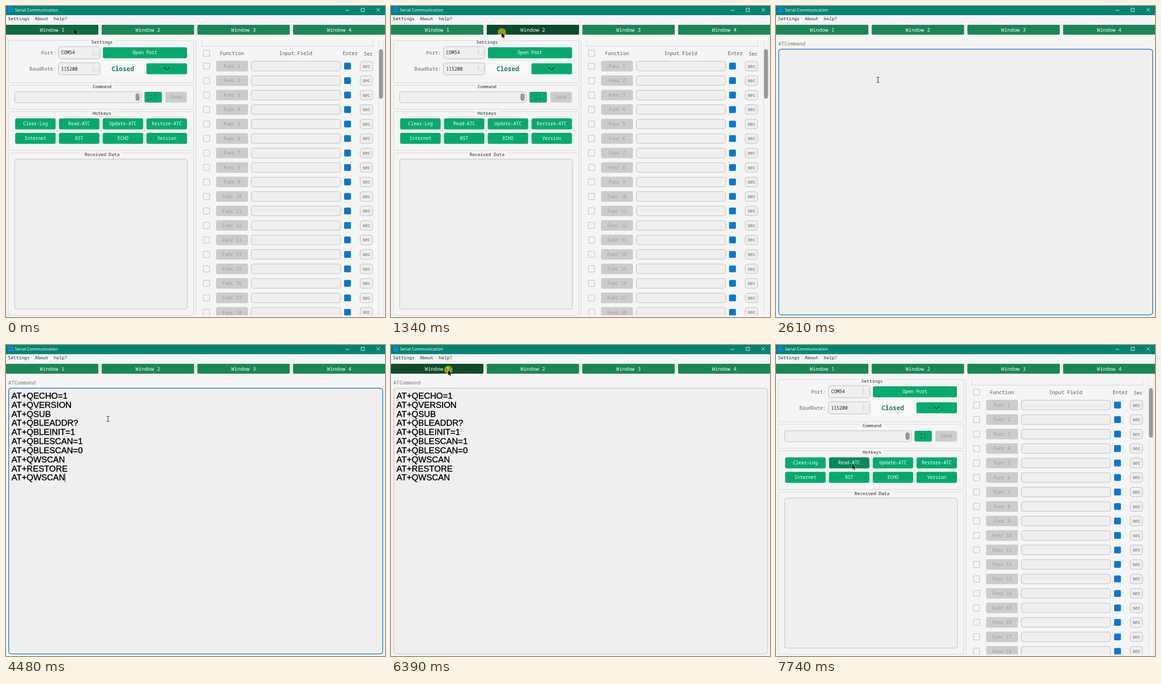
Write an HTML page that moves like this. It is 825 px wide and 678 px high and loops after 8000 ms.

```html
<!DOCTYPE html>
<html lang="en">
<head>
<meta charset="utf-8">
<title>Serial Communication</title>
<style>
  html, body { margin: 0; width: 100%; height: 100%; overflow: hidden; background: #f5f5f5; }
  svg { display: block; width: 825px; height: 678px; }
  text { font-family: "Noto Sans Mono", monospace; white-space: pre; }
  .sans { font-family: "Noto Sans", "Open Sans", sans-serif; }
  .arial { font-family: "Liberation Sans", Arial, sans-serif; }
</style>
</head>
<body>
<svg id="stage" viewBox="0 0 825 678"></svg>
<script>
const GREEN = '#04aa6d', LINE = '#c9c9c9', FIELD = '#efefef', GREY = '#cccccc';

// markup helpers
const rect = (x, y, w, h, fill, r = 0, more = '') =>
  `<rect x="${x}" y="${y}" width="${w}" height="${h}" rx="${r}" fill="${fill}" ${more}/>`;
const path = (d, stroke, width = 1, fill = 'none', more = '') =>
  `<path d="${d}" stroke="${stroke}" stroke-width="${width}" fill="${fill}" ${more}/>`;
const text = (s, x, y, size, fill, anchor = 'start', more = '') =>
  `<text x="${x}" y="${y}" font-size="${size}" fill="${fill}" text-anchor="${anchor}" ${more}>${s}</text>`;
const field = (x, y, w, h, r = 5, fill = FIELD, more = '') =>
  rect(x, y, w, h, fill, r, `stroke="${LINE}" stroke-width="1.5" ${more}`);
const button = (label, x, y, w, h, fill = GREEN, ink = '#fff', id = '') =>
  rect(x, y, w, h, fill, 3.5, id && `id="${id}"`) +
  text(label, x + w / 2, y + h / 2 + 3.4, 9.9, ink, 'middle');

function group(title, y, bottom) {
  const half = title.length * 2.93 + 5.5, mid = 209;
  return path(`M${mid - half} ${y}H5.5V${bottom}H408.5V${y}H${mid + half}`, '#d2d2d2') +
    text(title, mid, y + 6, 9.75, '#222', 'middle');
}

function combo(value, y) {
  return field(114.3, y, 90, 26.5) +
    path(`M189.5 ${y + 1}v25`, '#d4d4d4') +
    path(`M191.5 ${y + 8}v6q0 4.5 4.5 4.5h1q4.500 0 4.500-4.500v-6`, '#d0d0d0') +
    text(value, 120, y + 17, 10, '#222', 'start', 'font-weight="500"');
}

const checkbox = cy => field(429.7, cy - 6.8, 13.6, 13.6, 2.5, '#f5f5f5');

const tabX = [0, 208.4, 416.6, 625];

function frame() {
  return rect(0, 0, 825, 20, '#008573') +
    rect(4, 2, 12, 12, '#0a84d2', 1) +
    text('Serial Communication', 19.5, 12, 9.1, '#fff', 'start', 'class="sans"') +
    path('M739.500 9.500h7.500M773 5h7v7h-7zM806.500 4.500l7.500 7.500m0-7.500l-7.500 7.500', '#fff') +
    [['Settings', 4.3], ['About', 62.8], ['help?', 104]]
      .map(([s, x]) => text(s, x, 31, 9.8, '#222')).join('') +
    tabX.map((x, i) => rect(x, 41, 201, 21.5, '#198754', 1.5, `id="tab${i}"`) +
      text('Window ' + (i + 1), x + 100.3, 55.8, 11.2, '#fff', 'middle')).join('');
}

function leftPanel() {
  const keys = ['Clear-Log', 'Read-ATC', 'Update-ATC', 'Restore-ATC', 'Internet', 'RST', 'ECHO', 'Version'];
  return group('Settings', 75.5, 167) + group('Command', 172.5, 225) +
    group('Hotkeys', 230.5, 315) + group('Received Data', 320.5, 674) +
    text('Port:', 109, 105.5, 10.8, '#666', 'end') +
    text('BaudRate:', 109, 141, 10.8, '#666', 'end') +
    combo('COM54', 88.4) + combo('115200', 123.8) +
    button('Open Port', 211, 90, 183, 24) +
    rect(211, 122, 87.500, 30, '#f8f8f8', 4, 'stroke="#fff"') +
    text('Closed', 254.2, 142, 13.6, '#197f50', 'middle', 'font-weight="700"') +
    button('', 305.7, 125, 88.3, 23.7) +
    path('M344 134l5.700 5.500l5.700-5.500', '#111', 1.2) +
    field(18.8, 186.8, 276, 24) +
    rect(281.8, 190.5, 9.2, 16.3, '#999', 4.5) +
    button('', 301.5, 187, 37.8, 23.5) +
    path('M315.500 197v-2.500h2.500M322 194.500h2.500v2.500M324.500 200.500v2.500h-2.500M318 203h-2.500v-2.500', '#35483c', 1.2) +
    button('Send', 346.8, 187, 47, 23.5, GREY, '#999') +
    keys.map((s, i) => button(s, 20 + i % 4 * 95.3, i < 4 ? 245 : 276.5, 88, 24, GREEN, '#fff', 'key' + i)).join('') +
    field(18.8, 333.8, 376, 327);
}

function rightPanel() {
  let out = path('M413.500 75V674', '#cfcfcf') +
    path('M426.500 75V87.500H798.500V75', '#d2d2d2') +
    path('M811.500 75V674M821.500 75V674', '#dcdcdc') +
    rect(812, 94, 8.5, 108, '#999', 4.2) + checkbox(103) +
    [['Function', 465.7, 107], ['Input Field', 594.8, 107], ['Enter', 733, 107], ['Sec', 778.7, 107.7]]
      .map(([s, x, y]) => text(s, x, y, 10.9, '#555')).join('');
  for (let i = 0; i < 18; i++) {
    const y = 131 + i * 31.58;
    out += checkbox(y) +
      rect(456.7, y - 12.2, 70.8, 24.4, GREY, 4, 'stroke="#fff"') +
      text('Func ' + (i + 1), 492, y + 3.7, 10, '#999', 'middle') +
      field(534, y - 10.5, 194.3, 21) +
      rect(736, y - 7.4, 14.8, 14.8, '#0078d7', 2.5) +
      field(771, y - 10.5, 27, 21) +
      text('sec', 784.5, y + 3.5, 10.4, '#666', 'middle', 'class="arial"');
  }
  return `<g clip-path="url(#view)">${out}</g>`;
}

function editor() {
  const lines = ['QECHO=1', 'QVERSION', 'QSUB', 'QBLEADDR?', 'QBLEINIT=1', 'QBLESCAN=1',
    'QBLESCAN=0', 'QWSCAN', 'RESTORE', 'QWSCAN'];
  return text('ATCommand', 5, 86.3, 11, '#74786c') +
    field(5.8, 94.3, 814.2, 579.3, 6, FIELD, 'id="box"') +
    '<g id="lines">' + lines.map((s, i) => text('AT+' + s, 12, 117 + i * 19.83, 18.5, '#000', 'start',
      'class="arial" stroke="#000" stroke-width=".45"')).join('') + '</g>' +
    rect(0, 0, 1, 20, '#000', 0, 'id="caret"');
}

const stage = document.getElementById('stage');
stage.innerHTML =
  '<clipPath id="view"><rect x="410" y="74" width="415" height="600.500"/></clipPath>' +
  frame() +
  `<g id="page1">${leftPanel()}${rightPanel()}</g><g id="page2">${editor()}</g>` +
  '<g id="mouse"><circle id="press" cx=".5" cy="-.8" r="9" fill="#ffe800" fill-opacity=".52"/>' +
  path('M0 0V11.300L2.600 8.900L4.400 12.800L6.200 12L4.500 8.200H8Z', 'rgba(255,255,255,.35)', .6, '#000', 'id="arrow"') +
  path('M-3 -5.500H-.8L0 -5L.8 -5.500H3M0 -5V5M-3 5.500H-.8L0 5L.8 5.500H3', '#111', 1, 'none', 'id="beam"') +
  '</g>';

const $ = id => document.getElementById(id);
const show = (id, on) => $(id).setAttribute('visibility', on ? 'visible' : 'hidden');
const within = (t, spans) => spans.find(([a, b]) => t >= a && t < b);

// start, last step, steps, end x, end y
const moves = [
  [450, 880, 7, 240.8, 58],
  [1740, 1950, 4, 222, 161],
  [4950, 5020, 2, 238.5, 154],
  [5550, 6320, 12, 124.5, 55],
  [7250, 7740, 8, 166, 259.5]
];
const presses = [[1340, 1470], [2080, 2210], [6390, 6520]];
const carets = [[2080, 2610, 120], [3690, 4220, 101], [4480, 4750, 279], [5290, 5820, 279]];

function mouseAt(t) {
  let x = 148, y = 50;
  for (const [start, last, steps, toX, toY] of moves) {
    if (t < start) break;
    const gap = (last - start) / (steps - 1);
    const p = Math.min(1, (Math.floor((t - start) / gap + 1e-6) + 1) / steps);
    const e = p * p * (3 - 2 * p);
    x += (toX - x) * e;
    y += (toY - y) * e;
  }
  return [x, y];
}

function draw(t) {
  const [x, y] = mouseAt(t);
  const pressed = !!within(t, presses);
  const second = t >= 1470 && t < 6520;
  const caret = within(t, carets);
  const beam = second ? y > 94 : y > 187 && y < 211;

  show('page1', !second);
  show('page2', second);
  tabX.forEach((left, i) => {
    const over = y > 41 && y < 62.5 && x >= left && x < left + 201;
    $('tab' + i).setAttribute('fill', !over ? '#198754' : pressed ? '#0c4a2a' : '#0e6b3f');
  });
  $('key1').setAttribute('fill', !second && y > 245 ? '#038a58' : GREEN);
  $('box').setAttribute('stroke', t >= 2080 && t < 6390 ? '#0b74c0' : LINE);
  show('lines', second && t >= 4480);
  show('caret', caret);
  if (caret) {
    $('caret').setAttribute('x', caret[2] > 200 ? 128 : 12);
    $('caret').setAttribute('y', caret[2]);
  }
  $('mouse').setAttribute('transform', `translate(${x} ${y})`);
  show('press', pressed);
  show('arrow', !beam);
  show('beam', beam);
}

const begin = performance.now();
function tick() {
  draw((performance.now() - begin) % 8000);
  requestAnimationFrame(tick);
}
tick();
</script>
</body>
</html>
```
